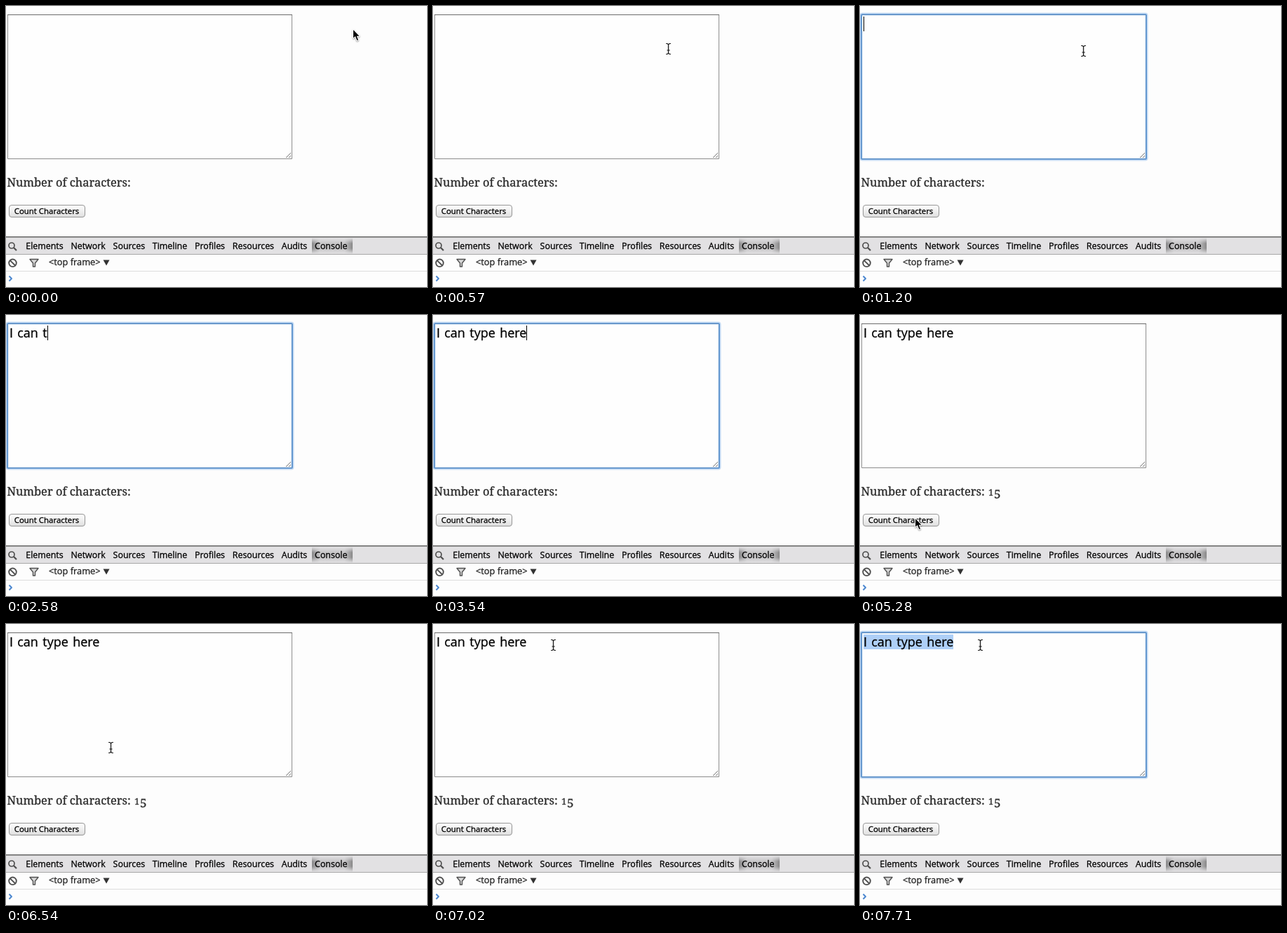
These frames come from a looping animation (600 by 400 pixels, 8000 ms). An HTML page with a canvas:

```html
<!DOCTYPE html>
<html lang="en">
<head>
<meta charset="utf-8">
<title>Character counter</title>
<style>
  html, body { margin: 0; width: 100%; height: 100%; overflow: hidden; background: #fdfdfd; }
  canvas { display: block; }
</style>
</head>
<body>
<canvas id="stage" width="600" height="400"></canvas>
<script>
const ctx = document.getElementById('stage').getContext('2d');
ctx.lineJoin = 'round';

const LOOP = 8000;
const SANS = '"Open Sans", sans-serif';
const SERIF = '"Noto Serif", serif';
const TOOLBAR = '#e2e1e3';

const MESSAGE = 'I can type here';
const FIRST_KEY = 1890, KEY_GAP = 115;
const FOCUS = 1200, PRESS = 5040, RELEASE = 5220;
const REFOCUS = 7260, SELECT_WORD = 7440, SELECT_LINE = 7710;
const BLINK = 450;

// Each move decelerates; x and y slow down at their own rate, which bends the path
const HOME = [495, 34];
const MOVES = [
  { from: 30, until: 810, to: [318, 64], power: [2, 2] },
  { from: 3990, until: 4680, to: [79, 290], power: [3, 2.3] },
  { from: 6360, until: 7020, to: [171, 30], power: [4.5, 1.8] }
];

const clamp = (value, low, high) => Math.min(high, Math.max(low, value));

function pointerAt(time) {
  return MOVES.reduce((place, { from, until, to, power }) => {
    const left = 1 - clamp((time - from) / (until - from), 0, 1);
    return place.map((start, axis) => to[axis] + (start - to[axis]) * left ** power[axis]);
  }, HOME);
}

const keysPressed = time =>
  clamp(Math.floor((time - FIRST_KEY) / KEY_GAP) + 1, 0, MESSAGE.length);

function caretVisible(time) {
  const keys = keysPressed(time);
  const since = time >= REFOCUS ? REFOCUS : keys ? FIRST_KEY + (keys - 1) * KEY_GAP : FOCUS;
  return Math.floor((time - since) / BLINK) % 2 === 0;
}

function fillRect(x, y, w, h, color) {
  ctx.fillStyle = color;
  ctx.fillRect(x, y, w, h);
}

// A hairline outline gives the text a slightly heavier weight
function text(string, x, y, size, family = SANS, color = '#000') {
  ctx.font = `${size}px ${family}`;
  ctx.fillStyle = ctx.strokeStyle = color;
  ctx.lineWidth = .3;
  ctx.fillText(string, x, y);
  ctx.strokeText(string, x, y);
  return ctx.measureText(string).width;
}

function trace(points) {
  ctx.beginPath();
  points.forEach(([x, y]) => ctx.lineTo(x, y));
}

function strokePath(color, width = 1) {
  ctx.strokeStyle = color;
  ctx.lineWidth = width;
  ctx.stroke();
}

function line(points, color, width) {
  trace(points);
  strokePath(color, width);
}

function polygon(points, fill) {
  trace(points);
  ctx.closePath();
  ctx.fillStyle = fill;
  ctx.fill();
}

function circle(x, y, radius, color, width) {
  ctx.beginPath();
  ctx.arc(x, y, radius, 0, Math.PI * 2);
  strokePath(color, width);
}

function box(x, y, w, h, radius, fill, color, width) {
  ctx.beginPath();
  ctx.roundRect(x, y, w, h, radius);
  ctx.fillStyle = fill;
  ctx.fill();
  strokePath(color, width);
}

function gradient(x0, y0, x1, y1, stops) {
  const g = ctx.createLinearGradient(x0, y0, x1, y1);
  for (const [at, color] of stops) g.addColorStop(at, color);
  return g;
}

function drawTextarea(time) {
  const focused = (time >= FOCUS && time < PRESS) || time >= REFOCUS;
  const typed = MESSAGE.slice(0, keysPressed(time));
  const left = 4.9;

  box(2.5, 12.5, 405, 205, 0, '#fefefe', '#8d8d8d');
  line([[2, 12.5], [408, 12.5]], '#6c6c6c');
  for (const size of [7, 3]) line([[406 - size, 216], [406, 216 - size]], '#777');
  if (focused) {
    box(1.5, 11.5, 407, 207, 2, 'transparent', 'rgba(100,160,225,.35)', 4);
    box(2, 12, 406, 206, 1, 'transparent', '#5b93cf', 1.7);
  }

  ctx.font = `18px ${SANS}`;
  ctx.wordSpacing = '1.7px';
  const edge = string => Math.round(left + ctx.measureText(string).width);
  if (time >= SELECT_WORD) {
    const skipped = time < SELECT_LINE ? MESSAGE.lastIndexOf(' ') + 1 : 0;
    const start = edge(MESSAGE.slice(0, skipped));
    fillRect(start, 15, edge(MESSAGE) - start, 21, '#aecff7');
  } else if (focused && caretVisible(time)) {
    fillRect(edge(typed), 15, 1, 21, '#000');
  }
  text(typed, left, 32, 18);
  ctx.wordSpacing = '0px';
}

function drawCounter(time) {
  text('Number of characters:', 1.5, 257, 16.45, SERIF, '#2a2a2a');
  if (time >= RELEASE) {
    // Old-style figures: a short one and a descending five
    text('1', 183, 257, 12.8, SERIF, '#2a2a2a');
    text('5', 191, 261, 17, SERIF, '#2a2a2a');
  }

  const pressed = time >= PRESS && time < RELEASE;
  const [top, bottom] = pressed ? ['#b4b4b4', '#d4d4d4'] : ['#fff', '#dedede'];
  box(4.5, 283.5, 108, 17, 3.5, gradient(0, 283, 0, 301, [[0, top], [1, bottom]]), '#959595');
  text('Count Characters', 11.7, 296, 11.45);
}

// The active tab is shaded from both sides and fades out above and below
function drawActiveTab(x, y, w, h) {
  const side = 'rgba(0,0,0,.4)', middle = 'rgba(0,0,0,.12)', clear = 'rgba(226,225,227,0)';
  fillRect(x, y, w, h, gradient(x, 0, x + w, 0,
    [[0, side], [.2, middle], [.8, middle], [1, side]]));
  fillRect(x, y, w, h, gradient(0, y, 0, y + h,
    [[0, TOOLBAR], [.35, clear], [.65, clear], [1, TOOLBAR]]));
}

function drawDevtools() {
  fillRect(0, 328, 600, 26, TOOLBAR);
  drawActiveTab(436, 330, 58, 23);
  fillRect(0, 328, 600, 1, '#5e5e5e');
  fillRect(0, 329, 600, 1, '#a8a8a8');
  fillRect(0, 353, 600, 1, '#a8a8a8');
  fillRect(0, 377, 600, 1, '#dcdcdc');

  let x = 28.3;
  for (const tab of 'Elements Network Sources Timeline Profiles Resources Audits Console'.split(' ')) {
    x += text(tab, x, 346, 12.4) + 10.8;
  }

  const icon = '#505050';
  circle(8, 341, 4, icon, 1.7);
  line([[11, 344], [15, 348]], icon, 2.3);
  circle(9.5, 365.8, 5.3, icon, 1.9);
  line([[5.8, 362.1], [13.2, 369.5]], icon, 1.9);
  polygon([[34, 360.5], [46, 360.5], [41.5, 366], [41.5, 371], [38.5, 371], [38.5, 366]], '#d8d8d8');
  strokePath(icon, 1.4);

  text('<top frame>', 61, 369, 12.8, SANS, '#222');
  polygon([[138.5, 361.5], [147.5, 361.5], [143, 369.5]], '#333');
  line([[4.5, 384.5], [8, 388], [4.5, 391.5]], '#4a86cf', 1.9);
}

function drawArrow() {
  const shape = [[0, 0], [0, 11.5], [2.8, 9], [5.4, 15], [7, 14.3], [4.7, 8.8], [8.5, 8.8]];
  ctx.shadowColor = 'rgba(0,0,0,.35)';
  ctx.shadowBlur = 2;
  ctx.shadowOffsetY = 1;
  polygon(shape, '#fff');
  strokePath('#fff', 2.2);
  ctx.shadowColor = 'transparent';
  polygon(shape, '#000');
}

function drawBeam() {
  for (const [color, width] of [['rgba(255,255,255,.8)', 3], ['#222', 1.2]]) {
    for (const s of [-1, 1]) {
      line([[s * 3.5, -7.5], [s * 1.5, -7.5], [0, -6], [0, 6], [s * 1.5, 7.5], [s * 3.5, 7.5]], color, width);
    }
    line([[-2, 2], [2, 2]], color, width);
  }
}

function drawPointer(time) {
  const hiddenByTyping = time >= FIRST_KEY && time < MOVES[1].from;
  if (hiddenByTyping) return;
  const [x, y] = pointerAt(time);
  const overField = x > 2 && x < 408 && y > 12 && y < 218;
  const overLabel = x < 201 && y > 240 && y < 263;
  ctx.save();
  ctx.translate(Math.round(x), Math.round(y));
  if (overField || overLabel) {
    ctx.translate(.5, 0);
    drawBeam();
  } else {
    drawArrow();
  }
  ctx.restore();
}

function draw(time) {
  fillRect(0, 0, 600, 400, '#fdfdfd');
  drawTextarea(time);
  drawCounter(time);
  drawDevtools();
  drawPointer(time);
}

const start = performance.now();
function tick() {
  draw((performance.now() - start) % LOOP);
  requestAnimationFrame(tick);
}
tick();
</script>
</body>
</html>
```
